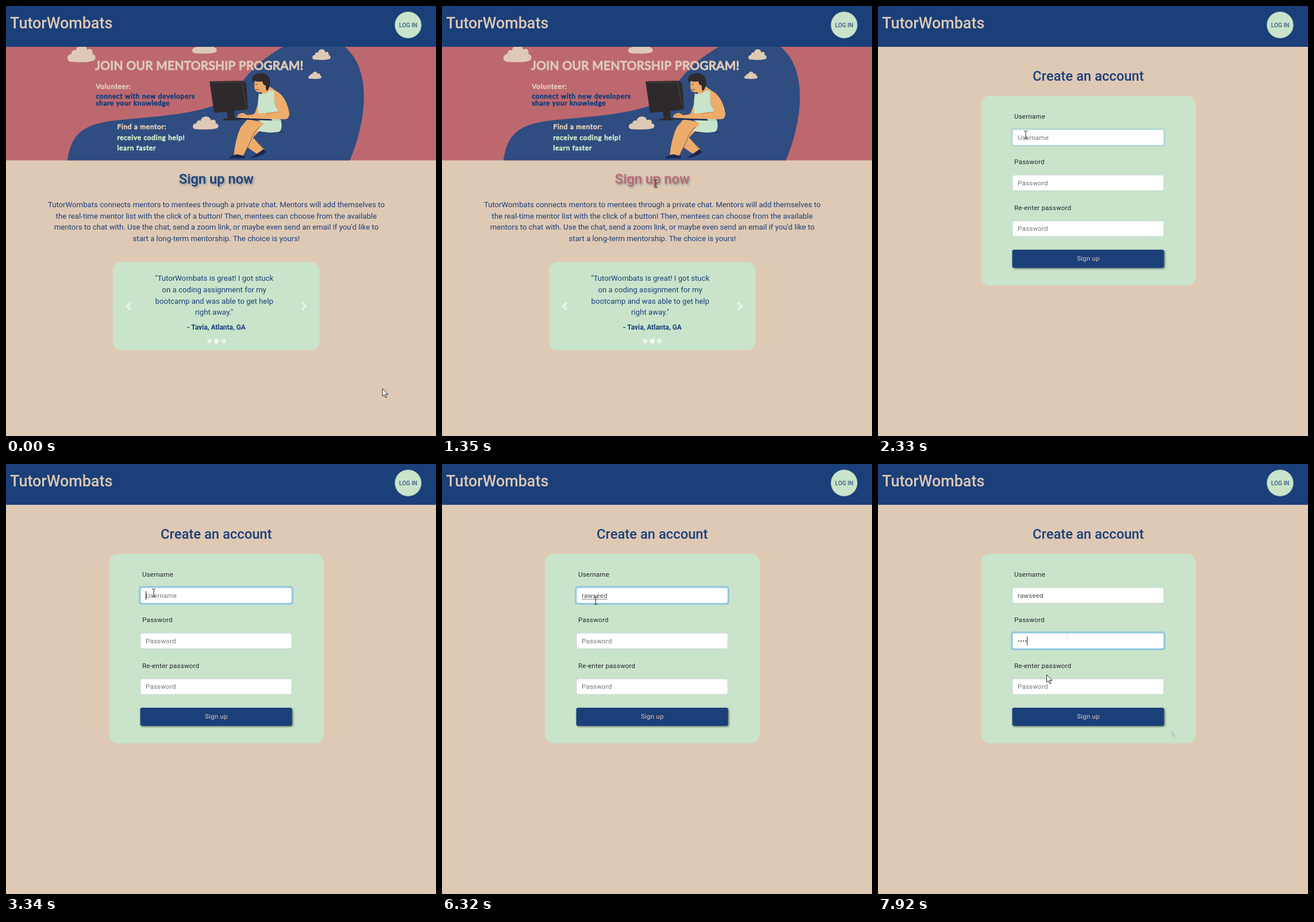
These frames come from a looping animation (748 px wide and 748 px high, 7990 ms). An HTML page with a canvas:

```html
<!DOCTYPE html>
<html lang="en">
<head>
<meta charset="utf-8">
<title>Sign up flow</title>
<style>
  html, body { margin: 0; width: 100%; height: 100%; overflow: hidden; background: #dec9b5; }
  canvas { display: block; width: 748px; height: 748px; }
</style>
</head>
<body>
<canvas id="stage" width="748" height="748"></canvas>
<script>
const ctx = document.getElementById('stage').getContext('2d');
const LOOP = 7990, STEP = 65, SWITCH = 1470, FOCUS_USER = 2280, FOCUS_PASS = 7400;
const NAVY = '#1b3f79', BEIGE = '#dec9b5', PINK = '#bd686f', GREEN = '#c9e4ca';
const HERO = '#2f4d80', SKIN = '#eeac6b', DARK = '#2e2a2c', INK = '#1b2750';
const ROBOTO = 'Roboto, "Open Sans", sans-serif';
const ROUND_FONT = 'Lato, "Open Sans", sans-serif';
const USER = 'rawseed';
const MID = 365.8;
const NAV_END = 71, HERO_END = 268.6;

const clamp = v => Math.max(0, Math.min(1, v));
const passed = (times, t) => times.filter(x => t >= x).length;

function fill(color, d) {
  ctx.fillStyle = color;
  ctx.fill(new Path2D(d));
}

function line(color, width, d) {
  ctx.strokeStyle = color;
  ctx.lineWidth = width;
  ctx.stroke(new Path2D(d));
}

function box(color, x, y, w, h, r) {
  ctx.fillStyle = color;
  ctx.beginPath();
  ctx.roundRect(x, y, w, h, r);
  ctx.fill();
}

function dot(color, x, y, r) {
  ctx.fillStyle = color;
  ctx.beginPath();
  ctx.arc(x, y, r, 0, Math.PI * 2);
  ctx.fill();
}

function text(str, x, y, size, color, { weight = 400, align = 'left', gap = 0, family = ROBOTO } = {}) {
  ctx.font = `${weight} ${size}px ${family}`;
  ctx.letterSpacing = gap + 'px';
  ctx.textAlign = align;
  ctx.fillStyle = color;
  ctx.fillText(str, x, y);
  return ctx.measureText(str).width;
}

const small = (str, x, y, color, align) => text(str, x, y, 11.55, color, { gap: 0.2, align });

// Marker look: regular weight thickened by a round outline
function lettering(str, x, y, size, color, gap) {
  text(str, x, y, size, color, { family: ROUND_FONT, gap });
  ctx.strokeStyle = color;
  ctx.lineWidth = 0.45 + size * 0.045;
  ctx.lineJoin = 'round';
  ctx.strokeText(str, x, y);
}

const note = (str, x, y, color) => lettering(str, x, y, 11.8, color, 0.75);

function cloud(x, y, w, h) {
  ctx.save();
  ctx.translate(x, y);
  ctx.scale(w / 100, h / 60);
  fill(BEIGE, 'M10 58C-6 54-2 32 14 32C14 20 24 16 30 20C34-4 66-6 70 18C82 10 92 20 88 32C104 34 102 56 86 56C60 62 30 59 10 58Z');
  ctx.restore();
}

function person() {
  line(INK, 1, 'M440 219.5H484');
  // monitor
  fill(DARK, 'M354 131L411 130L418 134L421 180L362 186Z');
  line('#57504f', 0.8, 'M355 133L410 132L419 181');
  fill(DARK, 'M384 183L397 181L398 195L404 197V199H377V197L386 195Z');
  // legs and shoes
  fill(SKIN, 'M404 228Q404 208 425 198L449 208Q432 222 430 229L450 250L438 258Q412 242 404 228Z');
  fill(SKIN, 'M420 197L457 204Q436 220 427 233L412 262L396 261Q399 230 409 210Z');
  line(INK, 0.6, 'M441 210Q430 220 426 234L413 260M430 228L448 250');
  fill(INK, 'M387 265Q395 258 403 258L415 261L416 265Z');
  fill(INK, 'M425 265Q433 259 438 256L448 249L453 254Q445 262 425 265Z');
  // clothes
  fill(GREEN, 'M437 198H478Q482 214 475 219Q454 222 436 217L449 205Z');
  fill(SKIN, 'M442 138H456L470 148L446 158Z');
  fill(SKIN, 'M443 158Q437 174 433 186L424 193L431 197L444 190Z');
  fill(GREEN, 'M440 152Q449 156 459 147L470 149Q466 166 475 180L477 198H440Q436 172 440 152Z');
  line('#7fa592', 0.6, 'M441 198Q462 199 476 198M467 158Q465 170 473 181');
  // head
  fill(SKIN, 'M433 128L452 124L455 140Q450 150 440 150Q432 150 432 139Z');
  fill(DARK, 'M428 127C430 114 455 113 458 126C461 134 459 143 454 148Q451 146 452 138Q447 139 446 131Q438 133 432 130L429 133Z');
  line(DARK, 0.8, 'M434 137L438 136M434 145Q437 147 440 145');
  // near arm and keyboard
  fill(SKIN, 'M467 147C482 151 491 172 493 187Q493 197 484 197L424 196L402 194Q402 187 412 186L420 190L440 187L474 184Q464 166 467 147Z');
  line('#9c6440', 0.6, 'M474 184L452 187M404 191L414 190M424 189L414 184');
  line(INK, 2.6, 'M402 196L462 198');
}

function hero() {
  ctx.save();
  ctx.beginPath();
  ctx.rect(0, NAV_END, 748, HERO_END - NAV_END);
  ctx.clip();
  ctx.fillStyle = PINK;
  ctx.fillRect(0, 0, 748, 300);
  fill(HERO, 'M107 269C114 215 142 204 200 198C262 192 330 188 372 169C412 150 402 118 483 70H588C638 110 627 200 598 269Z');
  cloud(107, 67, 49, 31);
  cloud(324, 60, 43, 23);
  cloud(533, 75, 32, 19);
  cloud(526, 114, 23, 13);
  cloud(325, 192, 45, 23);
  person();
  lettering('JOIN OUR MENTORSHIP PROGRAM!', 155, 111, 20.8, BEIGE, 0.4);
  note('Volunteer:', 156.5, 143.5, BEIGE);
  note('connect with new developers', 156.5, 160.5, NAVY);
  note('share your knowledge', 156.5, 173, NAVY);
  note('Find a mentor:', 193.5, 214, BEIGE);
  note('receive coding help!', 193.5, 232.5, GREEN);
  note('learn faster', 193.5, 251, GREEN);
  ctx.restore();
}

function chevron(x, y, flip) {
  ctx.save();
  ctx.translate(x, y);
  ctx.scale(flip ? -1.95 : 1.95, 1.95);
  fill('rgba(255,255,255,.5)', 'M1.25-4l-4 4 4 4 1.5-1.5-2.5-2.5 2.5-2.5z');
  ctx.restore();
}

function header() {
  ctx.fillStyle = NAVY;
  ctx.fillRect(0, 0, 748, NAV_END);
  text('TutorWombats', 7, 39, 26.9, BEIGE, { weight: 500 });
  dot('#7fa5a0', 699.5, 33, 23.4);
  dot(GREEN, 699.5, 33, 22.6);
  text('LOG IN', 699.7, 37, 10.2, '#3b5c84', { weight: 500, align: 'center' });
}

function homePage(hover) {
  hero();
  ctx.save();
  ctx.shadowColor = 'rgba(60,95,125,.6)';
  ctx.shadowOffsetX = ctx.shadowOffsetY = 1.7;
  ctx.shadowBlur = 3.5;
  text('Sign up now', MID, 309, 23.76, hover ? PINK : NAVY, { weight: 500, align: 'center' });
  ctx.restore();

  ['TutorWombats connects mentors to mentees through a private chat. Mentors will add themselves to',
   'the real-time mentor list with the click of a button! Then, mentees can choose from the available',
   "mentors to chat with. Use the chat, send a zoom link, or maybe even send an email if you'd like to",
   'start a long-term mentorship. The choice is yours!'
  ].forEach((s, i) => text(s, MID, 349.8 + i * 19.8, 13.2, NAVY, { align: 'center' }));

  box(GREEN, 186, 445.3, 359.5, 153.5, 15);
  ['"TutorWombats is great! I got stuck', 'on a coding assignment for my',
   'bootcamp and was able to get help', 'right away."'
  ].forEach((s, i) => text(s, 362.2, 478 + i * 19.8, 13.2, NAVY, { align: 'center' }));
  text('- Tavia, Atlanta, GA', MID, 563, 11.9, NAVY, { weight: 700, align: 'center' });
  chevron(212.8, 522, false);
  chevron(518.5, 522, true);
  [-1, 0, 1].forEach(i => dot(i ? 'rgba(255,255,255,.55)' : '#fff', MID + i * 12.2, 583, 4));
}

function field(y, value, hint, focus, caret, squiggle) {
  const x = 233.5, w = 264, h = 27.8;
  if (focus > 0) box(`rgba(0,123,255,${0.25 * focus})`, x - 2.5, y - 2.5, w + 5, h + 5, 5);
  box('#c3cdd0', x, y, w, h, 3.3);
  if (focus > 0) box(`rgba(115,185,240,${focus})`, x, y, w, h, 3.3);
  box('#fff', x + 0.8, y + 0.8, w - 1.6, h - 1.6, 2.6);
  const base = y + 18;
  if (!value) small(hint, 243, base, '#6f767c');
  const width = value ? small(value, 243, base, '#495057') : 0;
  if (squiggle) line('#6a5355', 0.8, `M243 ${base + 2.5}h${width}`);
  if (caret) line('#222', 1, `M${Math.round(243 + width) + 0.5} ${y + 6.5}v15`);
}

const CARET_FLIPS = [2340, 2870, 3340, 3870, 4400, 5060, 5330, 6060, 6580, 7110, 7400];
const USER_KEYS = [4400, 4460, 4530, 5330, 5400, 5460, 5530];
const PASS_KEYS = [7520, 7590, 7650, 7720];

function formPage(t) {
  text('Create an account', MID, 129.5, 23.76, NAVY, { weight: 500, align: 'center' });
  box(GREEN, 179, 156, 374, 330, 16);
  small('Username', 237, 196.3, '#23272c');
  small('Password', 237, 275.3, '#23272c');
  small('Re-enter password', 237, 355.2, '#23272c');

  const pass = clamp((t - FOCUS_PASS) / 150);
  const user = clamp((t - FOCUS_USER) / 150) - pass;
  const caret = passed(CARET_FLIPS, t) % 2 === 1;
  const onPass = t >= FOCUS_PASS;
  field(214.7, USER.slice(0, passed(USER_KEYS, t)), 'Username', user, caret && !onPass, t >= 6320 && !onPass);
  field(293.7, '•'.repeat(passed(PASS_KEYS, t)), 'Password', pass, caret && onPass);
  field(373.4, '', 'Password', 0, false);

  ctx.save();
  ctx.shadowColor = 'rgba(0,0,0,.5)';
  ctx.shadowOffsetX = ctx.shadowOffsetY = 1.6;
  ctx.shadowBlur = 3.5;
  box(NAVY, 233.5, 424, 264, 31.5, 3.3);
  ctx.restore();
  small('Sign up', MID, 443.3, BEIGE, 'center');

  // faint marks the pointer leaves behind
  if (t >= 6980) pointer('ghost', 509.5, 462);
  if (t >= 7720) line('rgba(120,120,120,.25)', 1, 'M329.5 293V305H326');
}

const ARROW = 'M.5 .5V14L3.6 11.2L5.8 16.2L7.8 15.3L5.7 10.5H10Z';
const HAND = 'M-1.3 1Q0-.6 1.3 1V6.5L4 6.7L6.6 7.5Q9 7.5 9 9.5V13L7.5 18H-1.5L-5 11.8Q-4.5 9.3-1.3 12Z';

function pointer(kind, x, y) {
  ctx.save();
  ctx.translate(x, y);
  ctx.lineJoin = 'round';
  if (kind === 'ghost') {
    fill('#c3cac8', ARROW);
  } else if (kind === 'beam') {
    line('#222', 1, 'M-3-6.5H-.8L0-5.5L.8-6.5H3M0-5.5V5.5M-3 6.5H-.8L0 5.5L.8 6.5H3');
  } else {
    const shape = kind === 'hand' ? HAND : ARROW;
    fill('#fff', shape);
    line('#111', 0.9, shape);
  }
  ctx.restore();
}

// Each move: start time, number of steps, end point, optional bend points
const MOVES = [
  { at: 70, n: 9, to: [365, 298], bend: [[560, 430], [400, 165]] },
  { at: 1000, n: 1, to: [368, 298] },
  { at: 1200, n: 1, to: [370, 308] },
  { at: 1350, n: 1, to: [372, 309] },
  { at: 1670, n: 4, to: [251, 223] },
  { at: 2200, n: 3, to: [257, 224] },
  { at: 6320, n: 5, to: [601, 681] },
  { at: 6720, n: 4, to: [509.5, 462] },
  { at: 6980, n: 2, to: [318, 336] },
  { at: 7110, n: 3, to: [329, 299] },
  { at: 7720, n: 4, to: [293, 366] }
];

function pointerAt(t) {
  let from = [654.5, 665];
  for (const { at, n, to, bend } of MOVES) {
    if (t < at) break;
    const k = Math.min(n, Math.floor((t - at) / STEP) + 1) / n;
    const u = k * k * (3 - 2 * k), v = 1 - u;
    const [a, b] = bend || [from, to];
    from = from.map((p, i) => v * v * v * p + 3 * v * v * u * a[i] + 3 * v * u * u * b[i] + u * u * u * to[i]);
  }
  return from;
}

function pointerKind(t, x, y) {
  const inside = (l, top, r, b) => x >= l && x <= r && y >= top && y <= b;
  if (t < 1350) {
    if (inside(301, 285, 431, 316)) return 'hand';
    return inside(73, 336, 658, 413) || inside(258, 464, 466, 566) ? 'beam' : 'arrow';
  }
  if (inside(233, 424, 498, 456)) return 'hand';
  return [214, 293, 373].some(top => inside(233, top, 498, top + 29)) ? 'beam' : 'arrow';
}

function draw(t) {
  ctx.fillStyle = BEIGE;
  ctx.fillRect(0, 0, 748, 748);
  header();
  const [x, y] = pointerAt(t);
  if (t < SWITCH) homePage(x > 301 && x < 431 && y > 285 && y < 316);
  else formPage(t);
  if (t < 1060 || t >= 1200) pointer(pointerKind(t, x, y), x, y);
}

const start = performance.now();
function tick() {
  draw((performance.now() - start) % LOOP);
  requestAnimationFrame(tick);
}
tick();
</script>
</body>
</html>
```
